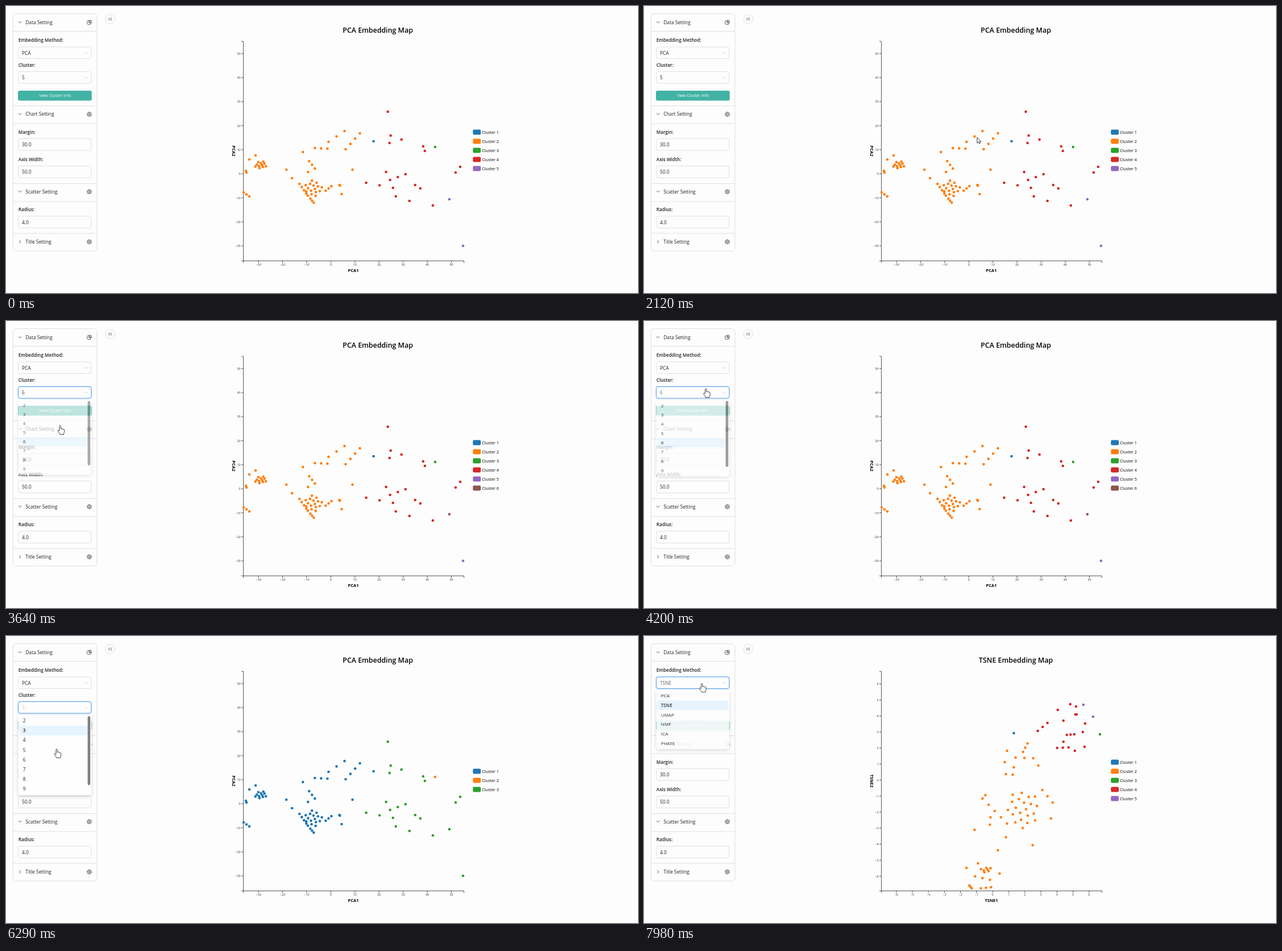
These frames come from a looping animation (1109x505 px, 8000 ms). An HTML page:

```html
<!DOCTYPE html>
<html lang="en">
<head>
<meta charset="utf-8">
<title>Embedding map</title>
<style>
  html, body { margin: 0; width: 100%; height: 100%; overflow: hidden; background: #fdfdfd; }
  svg { display: block; width: 1109px; height: 505px; font-family: "Open Sans", "Noto Sans", sans-serif; }
  .line { fill: none; stroke: #d9d9d9; stroke-width: .8; }
  .icon { fill: none; stroke: #333; stroke-width: .8; }
  .axis { fill: none; stroke: #444; stroke-width: .9; }
  .menu { filter: drop-shadow(0 2px 3px rgba(0, 0, 0, .16)); }
</style>
</head>
<body>
<svg id="stage" viewBox="0 0 1109 505"></svg>
<script>
const LOOP = 8000;
const INK = '#222';
const COLORS = ['#1f77b4', '#ff7f0e', '#2ca02c', '#d62728', '#9467bd', '#8c564b'];
const stage = document.getElementById('stage');

function add(parent, tag, attrs = {}, content) {
  const el = document.createElementNS('http://www.w3.org/2000/svg', tag);
  for (const k in attrs) el.setAttribute(k, attrs[k]);
  if (content !== undefined) el.textContent = content;
  parent.appendChild(el);
  return el;
}
const set = (el, attrs) => { for (const k in attrs) el.setAttribute(k, attrs[k]); };
// Text is placed by the middle of its capitals.
const text = (parent, x, cy, str, size, attrs = {}) =>
  add(parent, 'text', { x, y: cy + size * .36, 'font-size': size, fill: INK, ...attrs }, str);
const path = (parent, d, attrs) => add(parent, 'path', { d, ...attrs });

// ---------- Side panel ----------
const panel = add(stage, 'g');
const LINE = { class: 'line' }, ICON = { class: 'icon' };

function box(x, y, w, h, attrs) {
  return add(panel, 'rect', { x, y, width: w, height: h, rx: 3.6, ...attrs });
}
function gear(x, y) {
  add(panel, 'circle', { cx: x, cy: y, r: 3.3, ...ICON });
  add(panel, 'circle', { cx: x, cy: y, r: 1.4, ...ICON });
  add(panel, 'circle', { cx: x, cy: y, r: 4, ...ICON, 'stroke-dasharray': '1.7 2.489' });
}
function header(cy, title, open = true) {
  path(panel, open ? `M22 ${cy - 1.6}l2.6 2.8 2.6-2.8` : `M23.2 ${cy - 2.8}l2.8 2.6-2.8 2.6`, ICON);
  text(panel, 34.3, cy + .3, title, 8.3);
}
const label = (cy, str) => text(panel, 21.8, cy, str, 8.1, { 'font-weight': 600 });
function input(y, value) {
  box(21.5, y, 128, 21, LINE);
  text(panel, 28, y + 11, value, 8.3);
}
function select(y) {
  const glow = box(20.9, y - .6, 129.2, 21.7, { fill: 'none', stroke: '#d8ebff', 'stroke-width': 1.6 });
  const frame = box(21.5, y, 128, 20.5, LINE);
  path(panel, `M138.4 ${y + 9.2}l2.5 2.6 2.5-2.6`, { class: 'icon', style: 'stroke:#c4c4c4' });
  return { glow, frame, value: text(panel, 28, y + 10.6, '', 8.3) };
}

box(12.5, 13.5, 147, 417.5, { ...LINE, rx: 5 });
for (const y of [44.5, 175.5, 207, 312.5, 344, 400]) path(panel, `M12.5 ${y}H159.5`, LINE);
header(28.7, 'Data Setting');
header(190.2, 'Chart Setting');
header(326.5, 'Scatter Setting');
header(415, 'Title Setting', false);
for (const y of [190.5, 326.7, 415]) gear(146.2, y);
path(panel, 'M145.6 25.2A3.8 3.8 0 1 0 149.6 29.6H145.6Z M147 24.6V28.2H150.3A3.6 3.6 0 0 0 147 24.6Z', ICON);

label(60, 'Embedding Method:');
label(104, 'Cluster:');
label(222, 'Margin:');
label(270, 'Axis Width:');
label(358, 'Radius:');
const method = select(72), cluster = select(115.5);
box(21, 149, 129.5, 17.5, { fill: '#42b3a4', rx: 3 });
text(panel, 85.8, 157.8, 'View Cluster Info', 7.15, { fill: '#fff', 'text-anchor': 'middle' });
input(233.2, '30.0');
input(281.5, '50.0');
input(369.7, '4.0');

add(panel, 'circle', { cx: 183, cy: 23, r: 8.2, ...LINE });
path(panel, 'M182.4 20.3l-2.5 2.7 2.5 2.7M185.9 20.3l-2.5 2.7 2.5 2.7', ICON);

// ---------- Chart ----------
const chart = add(stage, 'g');

// Point makers: one dot, evenly spaced dots on a line, a spiral-filled ellipse.
const dot = (x, y) => [[x, y]];
const run = (x0, y0, x1, y1, n = 2) => Array.from({ length: n }, (_, i) =>
  [x0 + (x1 - x0) * i / (n - 1), y0 + (y1 - y0) * i / (n - 1)]);
const blob = (cx, cy, rx, ry, n) => Array.from({ length: n }, (_, i) => {
  const r = Math.sqrt((i + .5) / n), a = i * 2.4;
  return [cx + rx * r * Math.cos(a), cy + ry * r * Math.sin(a)];
});

const pcaGroups = () => [
  dot(645, 238),
  [
    run(621, 224, 596, 252, 4), run(594, 220, 566, 239, 3), run(542, 250, 564, 251, 3),
    run(532, 273, 542, 286, 3), run(521, 257, 530, 292), run(492, 288, 502, 303), dot(608, 288),
    run(438, 263, 427, 270), run(421, 290, 422, 293), blob(447, 280, 11, 7, 11),
    run(417, 328, 427, 335, 3), run(515, 313, 527, 330, 4), run(534, 339, 540, 346, 3),
    blob(539, 322, 17, 15, 16), run(561, 325, 571, 317, 3), run(585, 315, 586, 316), dot(589, 331)
  ].flat(),
  dot(753, 248),
  [
    run(670, 186, 694, 235), run(675, 228, 673, 241), run(732, 247, 735, 255), run(797, 283, 789, 293),
    run(701, 296, 674, 306, 3), run(632, 311, 679, 320, 3), run(718, 315, 727, 321),
    run(684, 335, 708, 343), dot(667, 292), dot(749, 351)
  ].flat(),
  dot(802, 422),
  dot(778, 340)
];

const tsneGroups = () => [
  dot(649, 171),
  [
    run(673, 189, 665, 204, 3), run(652, 214, 683, 215, 3), run(637, 202, 633, 222), dot(692, 228),
    run(649, 231, 635, 243), dot(647, 244), run(594, 286, 637, 330, 5), dot(599, 280),
    run(699, 271, 717, 293, 3), blob(666, 305, 30, 34, 21), dot(714, 321), run(608, 319, 607, 332),
    dot(580, 341), run(635, 354, 621, 377), dot(682, 368), run(586, 400, 566, 408),
    blob(600, 411, 11, 5, 7), dot(624, 418), run(581, 423, 607, 429, 3),
    run(571, 439, 575, 444, 3), run(591, 444, 609, 442, 3)
  ].flat(),
  dot(800, 173),
  [
    run(748, 120, 758, 124), dot(726, 130), run(757, 138, 759, 138), dot(736, 149),
    run(708, 153, 691, 167, 3), run(774, 154, 770, 169), run(742, 174, 755, 173, 3),
    dot(736, 186), run(725, 197, 745, 196, 3), dot(756, 202), dot(773, 195)
  ].flat(),
  dot(771, 121),
  dot(788, 142)
];

// Colour index of each point group, by number of clusters.
const ASSIGN = { 3: [0, 0, 1, 2, 2, 2], 5: [0, 1, 2, 3, 4, 4], 6: [0, 1, 2, 3, 4, 5] };

function buildMap(name, m) {
  const g = add(chart, 'g');
  const axis = { class: 'axis' }, mid = { 'text-anchor': 'middle' };
  text(g, 652.5, 42.3, name + ' Embedding Map', 12.35, { ...mid, 'font-weight': 600, fill: '#000' });
  path(g, 'M413 62.2H416.5V448.5H413M416.5 452V448.5H803.5V452', axis);
  for (let v = m.min; v <= m.max; v += m.step) {
    const x = m.x0 + v * m.unit, y = m.y0 - v * m.unit, str = String(v).replace('-', '\u2212');
    path(g, `M413 ${y}H416.5M${x} 448.5V452`, axis);
    text(g, 411.7, y + .1, str, 5.4, { 'text-anchor': 'end', fill: '#333' });
    text(g, x, 455.2, str, 5.4, { ...mid, fill: '#333' });
  }
  const bold = { ...mid, 'font-weight': 700, fill: '#000' };
  text(g, 609.5, 465, name + 1, 7.5, bold);
  text(g, 0, 0, name + 2, 7.5, { ...bold, transform: 'translate(400 255) rotate(90)' });
  const dots = m.groups.map(pts => {
    const dg = add(g, 'g');
    for (const [cx, cy] of pts) add(dg, 'circle', { cx, cy, r: 2.3 });
    return dg;
  });
  return { g, dots };
}
const maps = {
  PCA: buildMap('PCA', { step: 10, min: -30, max: 50, x0: 570, y0: 295.2, unit: 4.23, groups: pcaGroups() }),
  TSNE: buildMap('TSNE', { step: 1, min: -6, max: 6, x0: 611.8, y0: 253.6, unit: 28.2, groups: tsneGroups() })
};

const legend = COLORS.map((fill, i) => {
  const g = add(chart, 'g');
  add(g, 'rect', { x: 819.3, y: -4.5, width: 13.8, height: 9, rx: 2.2, fill });
  text(g, 835.3, .2, 'Cluster ' + (i + 1), 7.15, { fill: '#000' });
  return g;
});

// ---------- Drop-down menus ----------
const ROW = 17.1;
function buildMenu(top, height, items, scroll) {
  const g = add(stage, 'g', { class: 'menu' });
  add(g, 'rect', { x: 21.5, y: top, width: 128.3, height, rx: 4.5, fill: '#fefefe' });
  const mark = add(g, 'rect', { x: 23.5, width: scroll ? 119.5 : 124.3, height: ROW, rx: 2.4, fill: '#e6f4ff' });
  const rows = items.map((s, i) => text(g, 29.8, top + 10 + i * ROW, s, 8.1));
  if (scroll) add(g, 'rect', { x: 143.3, y: top + 1.6, width: 4.6, height: 121.5, rx: 2.3, fill: '#808080' });
  return { g, top, items, mark, rows };
}
const methodMenu = buildMenu(95.2, 105.5, ['PCA', 'TSNE', 'UMAP', 'NMF', 'ICA', 'PHATE']);
const clusterMenu = buildMenu(139.3, 141, [...'23456789'], true);

function drawMenu(menu, show, value) {
  menu.g.style.display = show > 0 ? '' : 'none';
  const sy = .8 + .2 * show, chosen = menu.items.indexOf(value);
  set(menu.g, { opacity: show, transform: `translate(0 ${menu.top * (1 - sy)}) scale(1 ${sy})` });
  menu.mark.setAttribute('y', menu.top + 10 + (chosen - .5) * ROW);
  menu.rows.forEach((r, i) => r.setAttribute('font-weight', i === chosen ? 600 : 400));
}
function drawSelect(sel, value, focus, fade) {
  sel.glow.style.display = focus ? '' : 'none';
  sel.frame.style.stroke = focus ? '#3a8ee6' : '#d9d9d9';
  sel.value.textContent = value;
  const c = Math.round(34 + 166 * fade);
  sel.value.setAttribute('fill', `rgb(${c},${c},${c})`);
}

// ---------- Pointer ----------
const outline = { fill: '#fff', stroke: '#111', 'stroke-width': .8, 'stroke-linejoin': 'round' };
const pointer = add(stage, 'g');
const arrow = path(pointer, 'M0 0V10L2.3 7.9 3.8 11.2 5.3 10.5 3.8 7.4H7Z', outline);
const hand = path(pointer, 'M-1.2 1.2C-1.2-.4 1.2-.4 1.2 1.2V5.6C1.2 4.6 3.4 4.7 3.4 6 3.4 5.2 5.5 5.3 5.5 6.6' +
  ' 5.5 5.9 7.4 6 7.4 7.5V10.5C7.4 12 6.3 13 6.3 15.4H-.4C-.4 13.8-3.4 11-4 9-4.3 7.7-2.8 7.3-1.2 9Z', outline);

// Moves of the pointer tip: start time, end time, x, y. It rests in between.
const MOVES = [
  [80, 560, 845, 145], [560, 840, 827, 223], [1040, 1400, 827, 265], [1400, 1840, 828, 287],
  [1880, 2500, 103, 121], [2580, 2680, 100, 148], [2760, 2840, 89, 212.5], [2840, 2980, 89, 250],
  [2980, 3160, 89, 213], [3500, 3960, 108.5, 119], [4220, 4600, 90, 162], [5010, 5210, 144, 216],
  [5210, 5810, 105, 124], [5900, 6290, 89, 199], [6290, 6570, 89, 197], [6830, 7300, 100, 80],
  [7420, 7620, 96, 121], [7870, 7980, 101.5, 83.5]
];
function pointerAt(t) {
  if (t < 80) return null;
  let x = 710, y = 1;
  for (const [a, b, tx, ty] of MOVES) {
    if (t < a) break;
    let u = clamp((t - a) / (b - a));
    if (b - a > 460) u = u * u * (3 - 2 * u);
    x += (tx - x) * u;
    y += (ty - y) * u;
  }
  return { x, y };
}

// ---------- Timeline ----------
const CLUSTER_OPEN = [[2540, 3480], [4150, 5010], [5850, 6820]];
const METHOD_OPEN = [[7400, 7860]];
const FADE = 200;
const clamp = v => Math.max(0, Math.min(1, v));

// Menus ease out when opening and ease in when closing.
function menuShow(spans, t) {
  for (const [a, b] of spans) {
    if (t >= a && t < b) return 1 - (1 - clamp((t - a) / FADE)) ** 5;
    if (t >= b && t < b + FADE) return 1 - ((t - b) / FADE) ** 5;
  }
  return 0;
}
function valueFade(spans, t) {
  for (const [a, b] of spans) {
    if (t >= a && t < b) return clamp((t - a) / 100);
    if (t >= b && t < b + FADE) return 1 - (t - b) / FADE;
  }
  return 0;
}

function render(t) {
  const count = t < 3480 ? 5 : t < 5010 ? 6 : t < 6820 ? 3 : 5;
  const name = t < 7900 ? 'PCA' : 'TSNE';
  const chosen = t < 7860 ? 'PCA' : 'TSNE';
  const cShow = menuShow(CLUSTER_OPEN, t), mShow = menuShow(METHOD_OPEN, t);
  drawSelect(method, chosen, t >= 7400, valueFade(METHOD_OPEN, t));
  drawSelect(cluster, count, t >= 2540 && t < 7400, valueFade(CLUSTER_OPEN, t));
  drawMenu(methodMenu, mShow, chosen);
  drawMenu(clusterMenu, cShow, String(count));

  const p = pointerAt(t);
  pointer.style.display = p ? '' : 'none';
  let hover = -1;
  if (p) {
    const within = (a, b) => p.y >= a && p.y <= b;
    const onPanel = p.x > 21 && p.x < 150;
    const useHand = onPanel && (within(72, 93) || within(115, 136.5) ||
      (cShow > 0 && within(136, 280)) || (mShow > 0 && within(93, 201)));
    hand.style.display = useHand ? '' : 'none';
    arrow.style.display = useHand ? 'none' : '';
    pointer.setAttribute('transform', `translate(${p.x} ${p.y})`);
    if (p.x > 819 && p.x < 866 && within(217.5, 297)) hover = Math.floor((p.y - 217.5) / 16);
  }

  for (const key in maps) maps[key].g.style.display = key === name ? '' : 'none';
  maps[name].dots.forEach((g, i) => {
    const c = ASSIGN[count][i];
    set(g, { fill: COLORS[c], opacity: hover < 0 || hover === c ? 1 : .22 });
  });
  legend.forEach((g, i) => {
    g.style.display = i < count ? '' : 'none';
    g.setAttribute('transform', `translate(0 ${254 + (i - (count - 1) / 2) * 16})`);
  });
}

const start = performance.now();
function tick() {
  render((performance.now() - start) % LOOP);
  requestAnimationFrame(tick);
}
tick();
</script>
</body>
</html>
```
